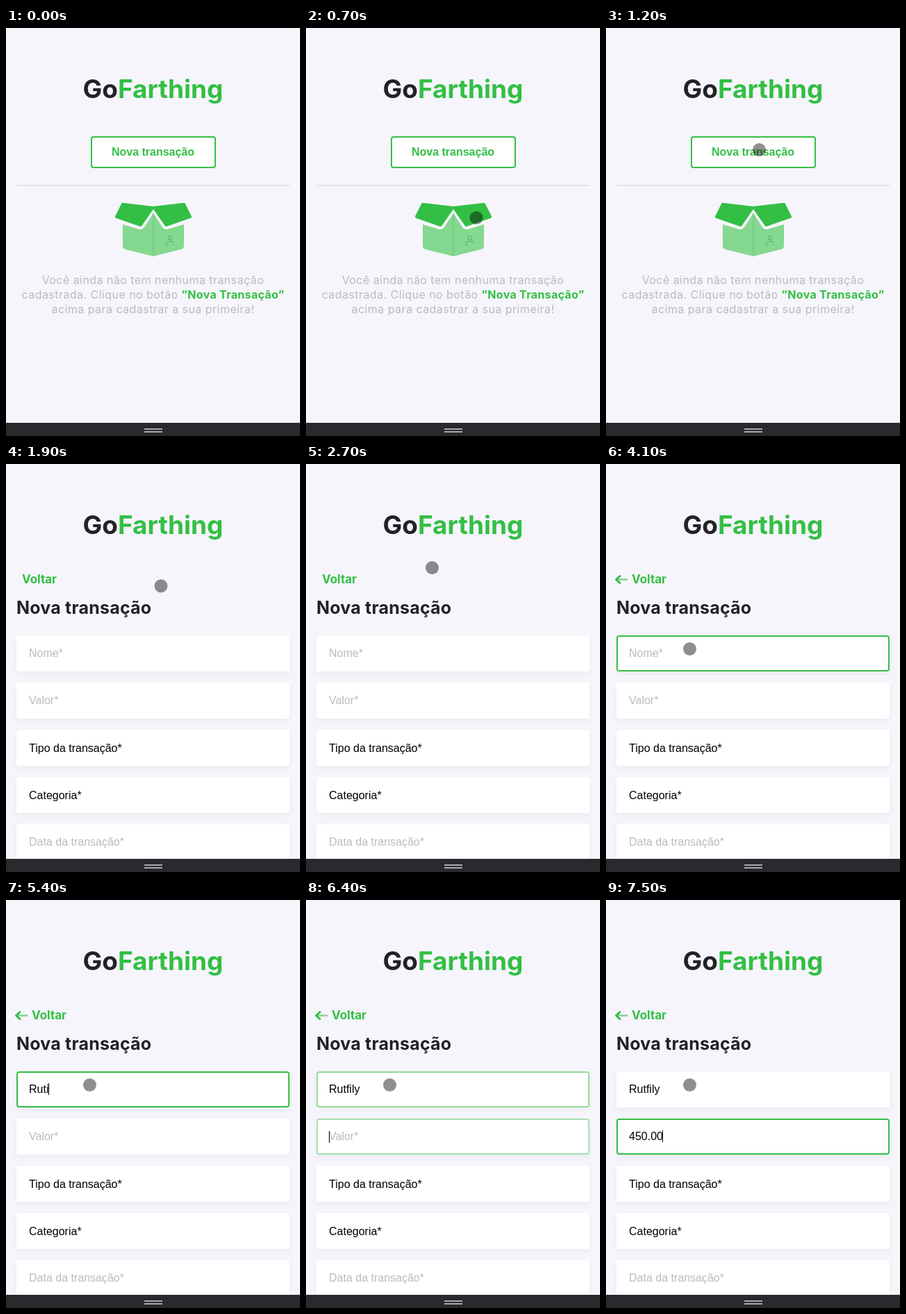
An HTML page that plays this animation: 423x588 px, repeating every 8 s.

```html
<!DOCTYPE html>
<html lang="pt-BR">
<head>
<meta charset="utf-8">
<title>GoFarthing</title>
<style>
  html, body { margin: 0; width: 100%; height: 100%; overflow: hidden; background: #f5f5fb; }
  svg { display: block; width: 423px; height: 588px; }
  text { font: 16px "Liberation Sans", Arial, sans-serif; white-space: pre; }
  .brand { font-family: Inter, sans-serif; }
  .title { font-size: 37px; font-weight: 700; }
  .heading { font-size: 25px; font-weight: 700; letter-spacing: .2px; }
  .back { font-size: 17px; font-weight: 700; }
  .button { font-weight: 700; }
  .hint { letter-spacing: .45px; fill: #bbb; }
  .hint tspan { font-weight: 700; letter-spacing: .3px; }
  .green { fill: #33bf44; }
  .hint .green { fill: #33bf44; }
  .dark { fill: #212126; }
  .middle { text-anchor: middle; }
  .field { fill: #fff; filter: drop-shadow(0 4px 5px rgba(0, 0, 0, .04)); }
  .focus { fill: none; stroke: #33bf44; stroke-width: 2; }
</style>
</head>
<body>
<svg viewBox="0 0 423 588">
  <rect width="423" height="588" fill="#f5f5fb"/>
  <text class="brand title dark middle" x="211.5" y="101">Go<tspan class="green">Farthing</tspan></text>

  <g id="home">
    <rect x="123" y="157" width="178" height="44" rx="3" fill="#fff" stroke="#33bf44" stroke-width="2"/>
    <text class="button green middle" x="211.5" y="184">Nova transação</text>
    <path d="M15 227H408" stroke="#e3e3e9" stroke-width="2"/>
    <path d="M168 283L191 290Q196 291 199 287L212 267L225 287Q228 291 233 290L256 283V314Q256 318 252 319L212 329L172 319Q168 318 168 314Z" fill="#84d88f"/>
    <path d="M212 267V329" stroke="#75ca81" stroke-width="1.5"/>
    <g class="green" stroke="#33bf44" stroke-width="4" stroke-linejoin="round">
      <path d="M168 254L211 259L193.5 284L159 272Z"/>
      <path d="M256 254L213 259L230.5 284L265 272Z"/>
    </g>
    <g fill="none" stroke="#5aa866">
      <circle cx="235.7" cy="302.5" r="2.8"/>
      <path d="M230.5 314Q229.5 309 234 308L238 307.2Q241 307 241.3 311.5"/>
    </g>
    <text class="brand hint middle" x="211.5" y="369">Você ainda não tem nenhuma transação</text>
    <text class="brand hint middle" x="211.5" y="390">cadastrada. Clique no botão <tspan class="green">”Nova Transação”</tspan></text>
    <text class="brand hint middle" x="211.5" y="411">acima para cadastrar a sua primeira!</text>
  </g>

  <g id="form">
    <g id="arrow" fill="none" stroke="#33bf44" stroke-linecap="round" stroke-linejoin="round">
      <path d="M17 166.5H30" stroke-width="2.5" opacity=".6"/>
      <path d="M20 161.5L14.5 166.5L20 171.5" stroke-width="3"/>
    </g>
    <text id="back" class="brand back green" y="172">Voltar</text>
    <text class="brand heading dark" x="15" y="216">Nova transação</text>
    <g id="fields"></g>
    <rect id="caret" width="1" height="17"/>
  </g>

  <circle id="cursor" r="9.5" fill="#000" fill-opacity=".44"/>
  <rect y="569" width="423" height="19" fill="#29292e"/>
  <path d="M199 578H225M199 582H225" stroke="#aaaaae" stroke-width="2"/>
</svg>
<script>
const DURATION = 8000, TICK = 100, FADE = 400;
const $ = id => document.getElementById(id);
const clamp = v => Math.max(0, Math.min(1, v));
const show = (el, on) => { el.style.display = on ? '' : 'none'; };

const labels = [['Nome*', 278], ['Valor*', 346], ['Tipo da transação*', 415],
  ['Categoria*', 483], ['Data da transação*', 550]];

$('fields').innerHTML = labels.map(([label, baseline], i) => {
  const y = 247 + 68 * i;
  return `<rect class="field" x="15" y="${y}" width="393" height="52" rx="4"/>
    <rect class="focus" x="16" y="${y + 1}" width="391" height="50" rx="3" opacity="0"/>
    <text x="33" y="${baseline}">${label}</text>`;
}).join('');

const texts = [...$('fields').querySelectorAll('text')];
const rings = [...$('fields').querySelectorAll('.focus')];
texts[4].setAttribute('fill', '#bbb');

// Each entry: time, value
const typedName = [[4600, 'R'], [4800, 'Ru'], [5000, 'Rut'], [5400, 'Ruti'], [5700, 'Rutf'],
  [5900, 'Rutfi'], [6000, 'Rutfil'], [6100, 'Rutfily']];
const typedValue = [[6900, '0.04'], [7000, '0.45'], [7200, '4.50'], [7400, '45.00'], [7500, '450.00']];
const caretOff = [[4100, 4500], [6800, 6900]];

// Each entry: time, x, y
const path = [[400, 41, 308], [800, 313, 262], [1200, 220.5, 175.5], [1800, 220.5, 175.5],
  [2000, 225.5, 176], [2100, 225.5, 176], [2400, 191.5, 152.5], [2600, 191.5, 152.5],
  [2700, 181.5, 149.5], [2800, 181.5, 149.5], [3200, 120.5, 266.5], [DURATION, 120.5, 266.5]];

const latest = (steps, t) => steps.reduce((value, [at, next]) => t >= at ? next : value, '');

function fill(index, value) {
  texts[index].textContent = value || labels[index][0];
  texts[index].setAttribute('fill', value ? '#000' : '#bbb');
}

function placeCursor(t) {
  show($('cursor'), t >= path[0][0]);
  const i = path.findIndex(p => p[0] > t);
  if (i < 1) return;
  const [t0, x0, y0] = path[i - 1], [t1, x1, y1] = path[i];
  const k = (t - t0) / (t1 - t0);
  $('cursor').setAttribute('cx', x0 + (x1 - x0) * k);
  $('cursor').setAttribute('cy', y0 + (y1 - y0) * k);
}

function placeCaret(t, index, value) {
  show($('caret'), t >= 3500 && !caretOff.some(([from, to]) => t >= from && t < to));
  const width = value ? texts[index].getComputedTextLength() : 0;
  $('caret').setAttribute('x', Math.floor(33 + width));
  $('caret').setAttribute('y', (value ? 264 : 265) + 68 * index);
}

function draw(t) {
  const onForm = t >= 1600, iconReady = t >= 3700;
  show($('home'), !onForm);
  show($('form'), onForm);
  show($('arrow'), iconReady);
  $('back').setAttribute('x', iconReady ? 37 : 23);

  const values = [latest(typedName, t), latest(typedValue, t)];
  values.forEach((value, i) => fill(i, value));

  const nameFocus = clamp((t - 3480) / FADE), valueFocus = clamp((t - 6220) / FADE);
  rings[0].setAttribute('opacity', nameFocus - valueFocus);
  rings[1].setAttribute('opacity', valueFocus);

  const active = t < 6300 ? 0 : 1;
  placeCaret(t, active, values[active]);
  placeCursor(t);
}

const start = performance.now();
function frame() {
  const t = (performance.now() - start) % DURATION;
  draw(Math.floor(t / TICK) * TICK);
  requestAnimationFrame(frame);
}
frame();
</script>
</body>
</html>
```
